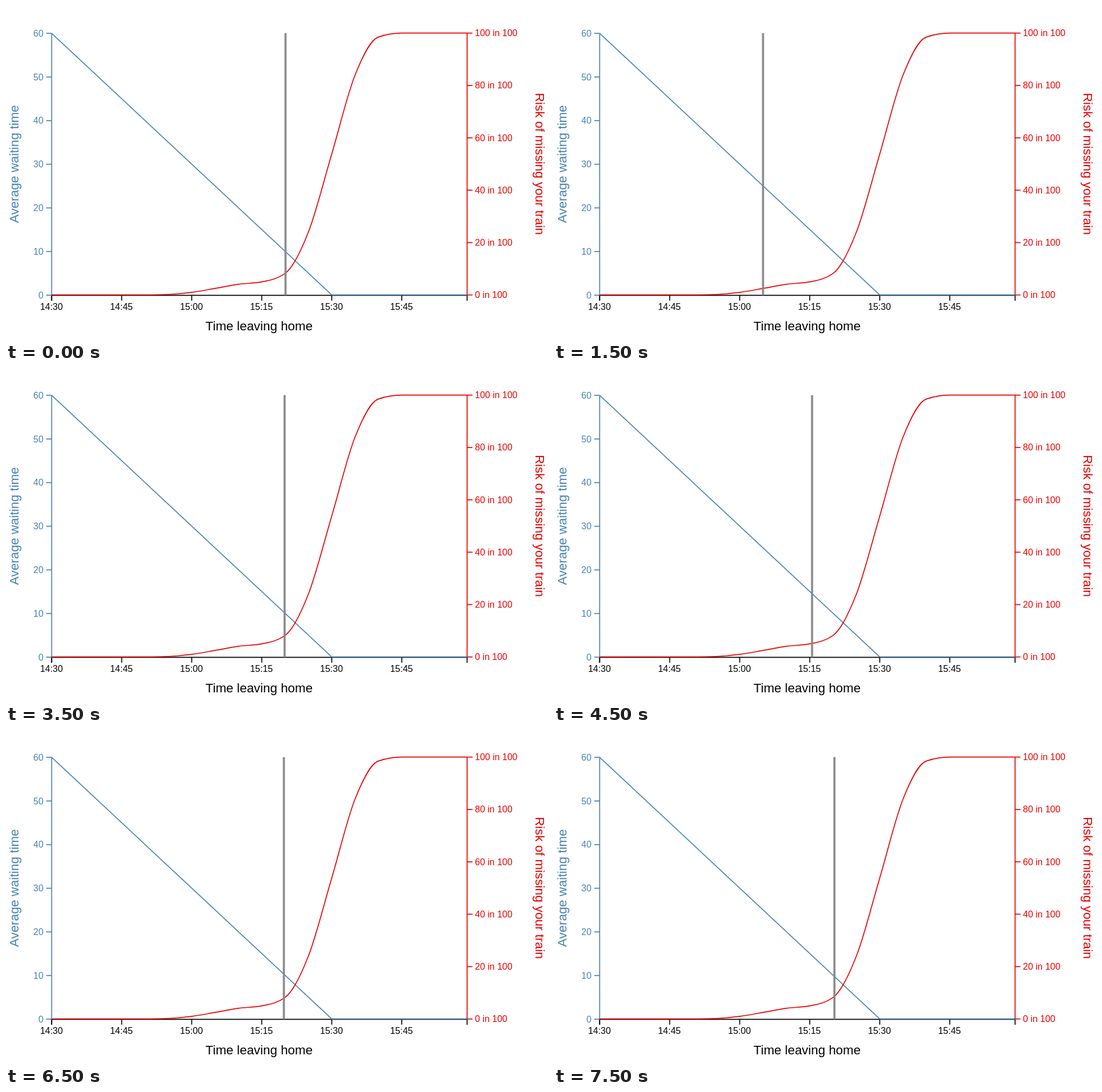
Animation, 953 px wide and 588 px high, one loop 8 s. Source, as an HTML page:

```html
<!DOCTYPE html>
<html lang="en">
<head>
<meta charset="utf-8">
<title>Waiting time and risk</title>
<style>
  html, body { margin: 0; width: 100%; height: 100%; overflow: hidden; background: #fff; }
  svg { display: block; font: 16px "Liberation Sans", Arial, Helvetica, sans-serif; }
  path { fill: none; stroke-width: 1.7; }
  .title { font-size: 22.4px; text-anchor: middle; }
</style>
</head>
<body>
<svg id="chart" width="953" height="588" viewBox="0 0 953 588"></svg>
<script>
const chart = document.getElementById('chart');
const LEFT = 80.3, RIGHT = 810.7, TOP = 48.1, BOTTOM = 509.1;
const BLUE = '#4682b4', RED = '#e80000', BLACK = '#000';
const TICK = 9.6, STEP_MS = 500;

const timeX = minutes => LEFT + minutes * 8.207;
const waitY = wait => BOTTOM - wait / 60 * (BOTTOM - TOP);
const riskY = risk => BOTTOM - 0.4 - risk / 100 * (BOTTOM - TOP);

function add(tag, attrs, text = '') {
  const el = document.createElementNS('http://www.w3.org/2000/svg', tag);
  for (const key in attrs) el.setAttribute(key, attrs[key]);
  el.textContent = text;
  return chart.appendChild(el);
}

const line = (d, stroke) => add('path', { d, stroke });
const label = (text, x, y, fill, anchor) =>
  add('text', { x, y, fill, 'text-anchor': anchor }, text);
const title = (text, x, y, fill, turn) =>
  add('text', { class: 'title', fill, transform: `translate(${x} ${y}) rotate(${turn})` }, text);

// Rising cubic through evenly spaced values that never overshoots
function risingCurve(values, start, gap) {
  const slope = values.map((v, i) => {
    const before = v - (values[i - 1] ?? v), after = (values[i + 1] ?? v) - v;
    return Math.min(2 * before, 2 * after, (before + after) / 2);
  });
  return values.slice(1).map((v, i) => {
    const t = start + i * gap;
    return `C${timeX(t + gap / 3)} ${riskY(values[i] + slope[i] / 3)}`
      + ` ${timeX(t + gap * 2 / 3)} ${riskY(v - slope[i + 1] / 3)}`
      + ` ${timeX(t + gap)} ${riskY(v)}`;
  }).join('');
}

// Time axis
line(`M${LEFT} ${BOTTOM + TICK}V${BOTTOM + 0.3}H${RIGHT}v${TICK}`, BLACK);
for (let t = 0; t <= 75; t += 15) {
  const clock = 14 * 60 + 30 + t;
  const text = `${Math.floor(clock / 60)}:${String(clock % 60).padStart(2, '0')}`;
  line(`M${timeX(t)} ${BOTTOM}v${TICK}`, BLACK);
  label(text, timeX(t) - 0.4, 534.7, BLACK, 'middle');
}
title('Time leaving home', 445, 571, BLACK, 0);

// Waiting time axis
line(`M${LEFT} ${TOP}V${BOTTOM}`, BLUE);
for (let v = 0; v <= 60; v += 10) {
  line(`M${LEFT - TICK} ${waitY(v)}H${LEFT}`, BLUE);
  label(v, LEFT - 14.4, waitY(v) + 5.6, BLUE, 'end');
}
title('Average waiting time', 22, 278.2, BLUE, -90);

// Risk axis
line(`M${RIGHT} ${riskY(100)}V${riskY(0)}`, RED);
for (let v = 0; v <= 100; v += 20) {
  line(`M${RIGHT} ${riskY(v)}h${TICK}`, RED);
  label(`${v} in 100`, RIGHT + 13.8, riskY(v) + 5.5, RED, 'start');
}
title('Risk of missing your train', 931, 278, RED, 90);

line(`M${LEFT} ${TOP}L${timeX(60)} ${BOTTOM - 0.5}H${RIGHT}`, BLUE);

// Risk at every fifth minute from 14:50 to 15:45
const risks = [0, 0.2, 1, 2.5, 4.1, 5, 8.2, 24, 53.8, 84, 98.5, 100];
line(`M${LEFT} ${riskY(0)}H${timeX(20)}${risingCurve(risks, 20, 5)}H${RIGHT}`, RED);

// Departure in minutes after 14:30; the marker jumps to the next one
const departures = [50.1, 36.75, 36, 35, 50.4, 35.8, 29.8, 49.9,
                    47.6, 45.5, 47.45, 48.3, 45.5, 49.75, 52.1, 50.3];
const marker = add('rect', { x: -1.75, y: TOP - 0.4, width: 3.5, height: BOTTOM - TOP + 0.6, fill: '#858585' });
marker.animate(
  [...departures, departures.at(-1)].map((t, i) => ({
    transform: `translateX(${timeX(t)}px)`, offset: i / departures.length, easing: 'step-end'
  })),
  { duration: departures.length * STEP_MS, iterations: Infinity }
);
</script>
</body>
</html>
```
